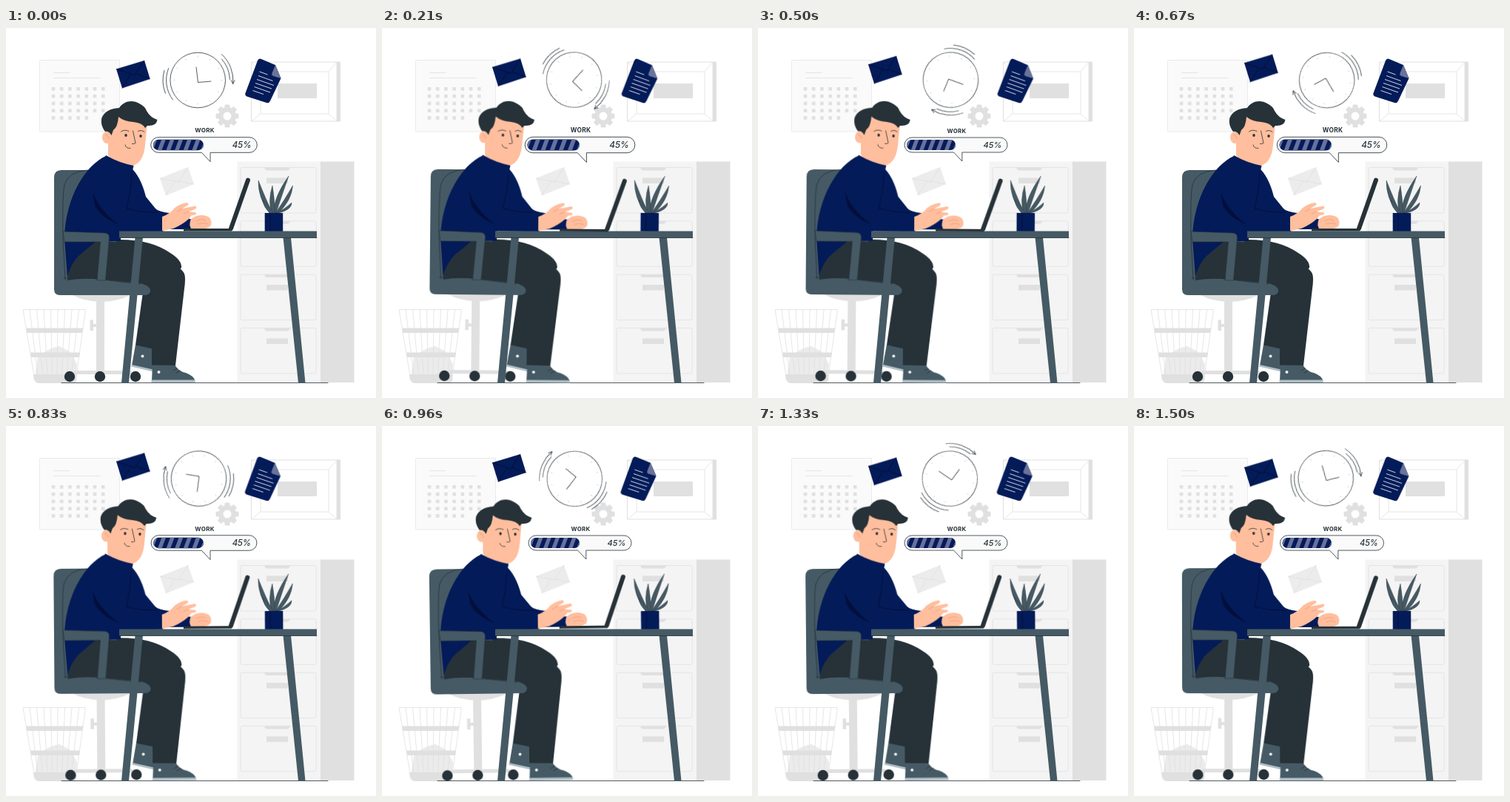
Recreate the animation shown at these times as an HTML page. Size 500 by 500 pixels, loop 1.54 s.

```html
<!DOCTYPE html>
<html lang="en">
<head>
<meta charset="utf-8">
<title>Work in progress</title>
<style>
html, body { margin: 0; width: 100%; height: 100%; overflow: hidden; background: #fff; }
svg { display: block; width: 100vw; height: 100vh; }
svg g { transform-box: view-box; }
.navy { fill: #041b59; }
.slate { fill: #455a64; }
.dark { fill: #263238; }
.skin { fill: #ffbe9d; }
.pale { fill: #f5f5f5; }
.grey { fill: #e0e0e0; }
.line { fill: none; stroke: #263238; stroke-width: .8; stroke-linecap: round; stroke-linejoin: round; }
.faint { fill: none; stroke: #e0e0e0; stroke-width: .8; }
.fold { fill: none; stroke: #020d36; stroke-width: .8; }
text { font-family: Inter, "Open Sans", sans-serif; fill: #263238; }
</style>
</head>
<body>
<svg viewBox="0 0 500 500">
  <!-- calendar -->
  <path d="M45.500 43.500H153.500V140H45.500Z" fill="#fafafa" stroke="#e6e6e6" stroke-width=".8"/>
  <path class="faint" d="M64 60.500H86M64 67.500H128"/>
  <g id="days" class="grey"></g>

  <!-- wall frame -->
  <path d="M331.500 46H447V126H331.500Z" fill="#fff" stroke="#e0e0e0"/>
  <path class="grey" d="M447 45.500H452V126.500H447Z"/>
  <path class="faint" d="M344 59H436V116H344ZM331.500 46L344 59M447 46L436 59M331.500 126L344 116M447 126L436 116"/>
  <path class="grey" d="M367 75H420V95H367Z"/>

  <!-- cabinet -->
  <path d="M312.500 180.500H425V479H312.500Z" fill="#f4f4f4"/>
  <path class="grey" d="M425 180.500H470.500V479H425Z"/>
  <g id="drawers"></g>

  <!-- gear and grey letter -->
  <g id="gear" class="grey"></g>
  <path d="M208 203L246 188L254 211L216 226.500Z" fill="#ececec"/>
  <path d="M208 203L233 208L246 188M216 226L229 206M254 211L234 207" fill="none" stroke="#e0e0e0" stroke-width=".8"/>

  <!-- waste basket -->
  <path d="M39 471L43 445Q55 433 72 430L86 437L96 454L95 471Z" fill="#ebebeb"/>
  <path class="grey" d="M27 405.500H104.500L103 412H28ZM33 438.500H100L99 445H34ZM37 468H95Q97 480 90 480H44Q37 479 37 468Z"/>
  <path class="faint" d="M23 380.500H107.500L95 470M23 380.500L38 470"/>
  <g id="wires" class="faint"></g>

  <path class="line" d="M75 479.500H435" stroke-width=".6"/>

  <!-- clock -->
  <g id="clock">
    <circle cx="259.200" cy="70.500" r="37.300" fill="#fff" stroke="#263238" stroke-width=".8"/>
    <g id="ticks" stroke="#bbb" stroke-width=".7"></g>
    <path class="line" d="M257 53L259.500 73.500L277 72"/>
    <g id="arcs" class="line"></g>
    <path class="line" d="M304.200 70.500L306.700 75.500L309 70.500"/>
  </g>

  <!-- navy letter -->
  <g id="letter">
    <path class="navy" d="M149 55.500L187 44L194.700 69L157 81.500Z"/>
    <path class="fold" d="M149 55.500L174 64L187 44M157 81.500L169 62.500M194.700 69L176 62"/>
  </g>

  <!-- document -->
  <g id="doc">
    <path class="navy" d="M345 42Q342 40.500 340 44L323.500 88Q322.500 91 325.500 92.500L352 101Q355.500 102 357 98.500L371.500 68L364 50Z"/>
    <path d="M364 50L371.500 68L361.500 65Q358.500 64 359.500 61Z" fill="#6a7399"/>
    <path d="M342.500 59L353.500 63M341 64.500L360.500 71.500M339 69.500L362 77.500M337 74.500L359 82M335.500 79.500L357 87M333.500 84.500L348 89.500" fill="none" stroke="#e8eaf3" stroke-width=".9"/>
  </g>

  <!-- progress bubble -->
  <g id="bubble">
    <path d="M208 148H327A10 10 0 0 1 327 168H275.800V180L264.500 168H208A10 10 0 0 1 208 148Z" fill="#fafafa" stroke="#263238" stroke-width=".8"/>
    <clipPath id="bar"><rect x="201" y="151" width="66" height="14" rx="7"/></clipPath>
    <g clip-path="url(#bar)">
      <path class="navy" d="M200 150H268V166H200Z"/>
      <g id="stripes" fill="#68719b"></g>
    </g>
    <text x="268.500" y="142" font-size="7.800" font-weight="700" text-anchor="middle" letter-spacing=".3">WORK</text>
    <text x="317" y="162" font-size="11" font-weight="500" font-style="italic" text-anchor="middle">45%</text>
  </g>

  <!-- plant -->
  <g id="plant">
    <g id="leaves" class="slate" stroke="#263238" stroke-width=".4"></g>
    <path class="navy" d="M349.700 250H374.200V275H349.700Z"/>
    <path class="fold" d="M357 250V275"/>
  </g>

  <!-- man, chair and laptop -->
  <g id="man" class="sway">
    <path class="grey" d="M122 365H133V463H166Q171 463 175 468H85Q90 463 96 463H122ZM113.500 394.500H118V400H122V404H118V409H113.500ZM90 361H168Q150 370 127 370Q105 369 90 361Z"/>
    <circle class="dark" cx="86" cy="471" r="7.200"/>
    <circle class="dark" cx="127" cy="471" r="7.200"/>
    <circle class="dark" cx="175" cy="471" r="7.200"/>

    <path class="slate" d="M65 202Q65 192 75 192H150V345L65 352Z"/>
    <path class="line" d="M110 192Q84 194 79 212Q76 225 77 285L80 340" stroke-width=".5"/>

    <!-- far leg -->
    <path class="slate" d="M175 428L199 433L201 463L170 456Z"/>
    <path d="M170 455L201 462V465L169 457.500Z" fill="#b0bec5"/>
    <circle cx="184.500" cy="443.500" r="2" fill="#eceff1"/>
    <path class="dark" d="M186 350L175 428.500L198 433.500L212 350Z"/>
    <path class="dark" d="M150 286Q195 285 222 304Q238 314 237 324L220 340L140 320Z"/>

    <!-- near leg -->
    <path class="slate" d="M198 455H228Q233 464 243 466Q254 470 255.500 477H197Z"/>
    <path d="M196.500 475.500H255L256 479H196.500Z" fill="#b0bec5"/>
    <circle cx="206.500" cy="465" r="2" fill="#eceff1"/>
    <path class="line" d="M226 463L231 460M230 466L235 463" stroke="#eceff1"/>
    <path class="dark" d="M83 341Q84 318 104 302L122 287L158 290C190 297 235 318 241 332Q243 338 241 352L229 456L197 455.500L197 362L150 345Z"/>
    <path class="line" d="M158 289Q215 300 234 324M196 362L191 350" stroke="#455a64" stroke-width=".5"/>

    <!-- torso and arms -->
    <path class="navy" d="M135 173C108 185 80 228 79 285L83 337Q88 315 104 303L122 288H155V275H212L221 250Q207 249 202 244L189 228Q182 200 168 188Z"/>
    <path d="M117 221Q123 242 152 266Q129 256 120 240Z" fill="#020f3c"/>
    <path class="fold" d="M170 195Q168 225 163 243Q180 250 205 249M163 243L166 247"/>
    <path class="navy" d="M206 247L252 259V272H206Z"/>

    <!-- head -->
    <path class="skin" d="M138 140L138 172Q150 186 172 186Q186 181 188 158L191 128L155 114Z"/>
    <path class="navy" d="M135 172Q152 182 172.500 186L170 197Q148 192 132 181Z"/>
    <ellipse class="skin" cx="136.500" cy="148" rx="6.500" ry="8"/>
    <path class="dark" d="M134 140Q127 131 129.500 121Q135 109 153 108C158 99 171 96 180 102Q188 106 190 112Q195 121 204.500 124Q203 133 191 132L188 135Q184 128 172 127Q159 126 152 120Q151 134 145 138L142.500 145Q139 139 134 140Z"/>
    <path class="line" d="M155 112Q165 112 176 120M180 103Q187 110 188 120" stroke="#455a64" stroke-width=".4"/>
    <path class="line" d="M155.500 140Q160 136.500 166 139.500M178.500 139.500Q183 137 187 140.500" stroke-width="1.400"/>
    <ellipse class="dark" cx="162" cy="145" rx="1.700" ry="2.100"/>
    <ellipse class="dark" cx="182" cy="146" rx="1.700" ry="2.100"/>
    <path class="line" d="M171.500 139L175 155.500Q174 157 170.500 156.500M161 158Q162 163 168 162.500" stroke-width="1"/>
    <path d="M134 145Q138 144 139 150" fill="none" stroke="#e89a78" stroke-width=".8"/>

    <!-- seat and armrest -->
    <path class="slate" d="M65 335Q72 341 83 341Q105 337 130 340L182 345Q196 349 195 356Q194 361 187 361H73Q65 361 65 353Z"/>
    <path class="line" d="M78 338Q105 336 130 340L182 346" stroke-width=".5"/>
    <path class="slate" d="M77 275L134 277Q140 278 139.500 284L134.500 341H123L127.500 289H79Z" stroke="#263238" stroke-width=".6"/>
  </g>

  <!-- desk -->
  <path class="slate" d="M174.500 283H185L166 479.500H156ZM374.500 283H385L404.500 479.500H395ZM153 274.500H420V283.500H153Z"/>
  <path class="line" d="M153 283.500H420" stroke-width=".4"/>

  <g class="sway">
    <path d="M327 205.500L304 271" fill="none" stroke="#263238" stroke-width="6" stroke-linecap="round"/>
    <path class="dark" d="M240 271H305V274.500H240Z"/>
    <path class="skin" d="M249.500 259Q256 252 266 253Q277 254 277.500 262Q278 270 269 271H250Q247 266 249.500 259Z"/>
    <path class="skin" d="M211 255Q222 251 228 243Q236 237 245 236Q248 238 245 240L238 244L256 240.500Q259 243 255 245L247 248L257 249.500Q258 253 251 253L247 258Q238 266 226 271L211 274Z"/>
    <path d="M238 244L231 248M247 248L240 251M257 261Q264 257 270 260M259 265Q266 262 273 265" fill="none" stroke="#e89a78" stroke-width=".7"/>
  </g>
</svg>
<script>
const LOOP = 1540, LEAD = 50;
const $ = id => document.getElementById(id);
const list = (n, fn) => Array.from({ length: n }, (_, i) => fn(i)).join('');
const polar = (cx, cy, r, deg) => {
  const a = deg * Math.PI / 180;
  return [cx + r * Math.cos(a), cy + r * Math.sin(a)].map(v => v.toFixed(2));
};

$('days').innerHTML = list(33, i =>
  `<rect x="${61.7 + i % 7 * 11.2}" y="${80 + Math.floor(i / 7) * 9.8}" width="4.600" height="4.600"/>`);

$('drawers').innerHTML = list(4, i => {
  const y = 188.500 + i * 72.300;
  return `<rect class="faint" x="317" y="${y}" width="102" height="61.500" rx="2"/>
    <path class="grey" d="M349 ${y}h35q-1 4 -4 4h-27q-3 0 -4 -4zM352 ${y + 14}h29v7.500h-29z"/>`;
});

$('gear').innerHTML = list(8, i =>
  `<rect x="295.500" y="103.500" width="7" height="8" rx="1.500" transform="rotate(${i * 45} 299 119)"/>`) +
  '<circle cx="299" cy="119" r="8.700" fill="none" stroke="#e0e0e0" stroke-width="6.400"/>';

$('wires').innerHTML = list(8, i =>
  `<path d="M${32 + i * 9.5} 380.500L${43 + i * 6.5} 470"/>`);

$('ticks').innerHTML = list(12, i => {
  const a = polar(259.2, 70.5, 31, i * 30), b = polar(259.2, 70.5, 33, i * 30);
  return `<path d="M${a}L${b}"/>`;
});

// radius, start and end angle of each motion arc
$('arcs').innerHTML = [[47.5, -48, 5], [43, -42, -2], [47.5, 158, 196], [43, 142, 202]].map(([r, from, to]) =>
  `<path d="M${polar(259.5, 70.7, r, from)}A${r} ${r} 0 0 1 ${polar(259.5, 70.7, r, to)}"/>`).join('');

$('stripes').innerHTML = list(7, i =>
  `<path d="M${195 + i * 11.3} 166l6 -16h5.500l-6 16z"/>`);

// base x, tip x, tip y, sideways bend
$('leaves').innerHTML = [[358, 341, 206, -6], [363, 382, 200, -7], [366, 387.5, 213, 2],
  [361, 360, 213, -4], [359, 347, 232, -2], [367, 386, 236, 3]].map(([x, tx, ty, bend]) => {
  const my = (250 + ty) / 2 + 2, mx = (x + tx) / 2 + bend;
  return `<path d="M${x - 2} 250Q${mx - 3} ${my} ${tx} ${ty}Q${mx + 7} ${my} ${x + 2} 250Z"/>`;
}).join('');

const play = (el, frames, origin, lead = LEAD) => {
  if (origin) el.style.transformOrigin = origin;
  el.animate(frames.map(([offset, transform]) => ({ offset, transform })),
    { duration: LOOP, delay: -lead, iterations: Infinity });
};
const wind = [[0, 0], [.25, 1], [.75, -1], [1, 0]].map(([at, deg]) => [at, `rotate(${deg - .13}deg)`]);
const beat = [[0, 1], [.1, 1.1], [.33, 1], [.4, 1], [.5, 1.1], [.6, 1], [1, 1]]
  .map(([at, k]) => [at, `scale(${k})`]);

document.querySelectorAll('.sway').forEach(el => play(el, wind, '197px 290px'));
play($('plant'), wind, '364px 237px');
play($('doc'), wind, '340px 140px');
play($('bubble'), beat, '267.5px 158px');
play($('letter'), [[0, 'translateY(.5px)'], [.5, 'translateY(-9px)'], [1, 'translateY(.5px)']]);
play($('clock'), [[0, 'rotate(0deg)'], [1, 'rotate(360deg)']], '259.9px 70.7px', 0);
</script>
</body>
</html>
```
